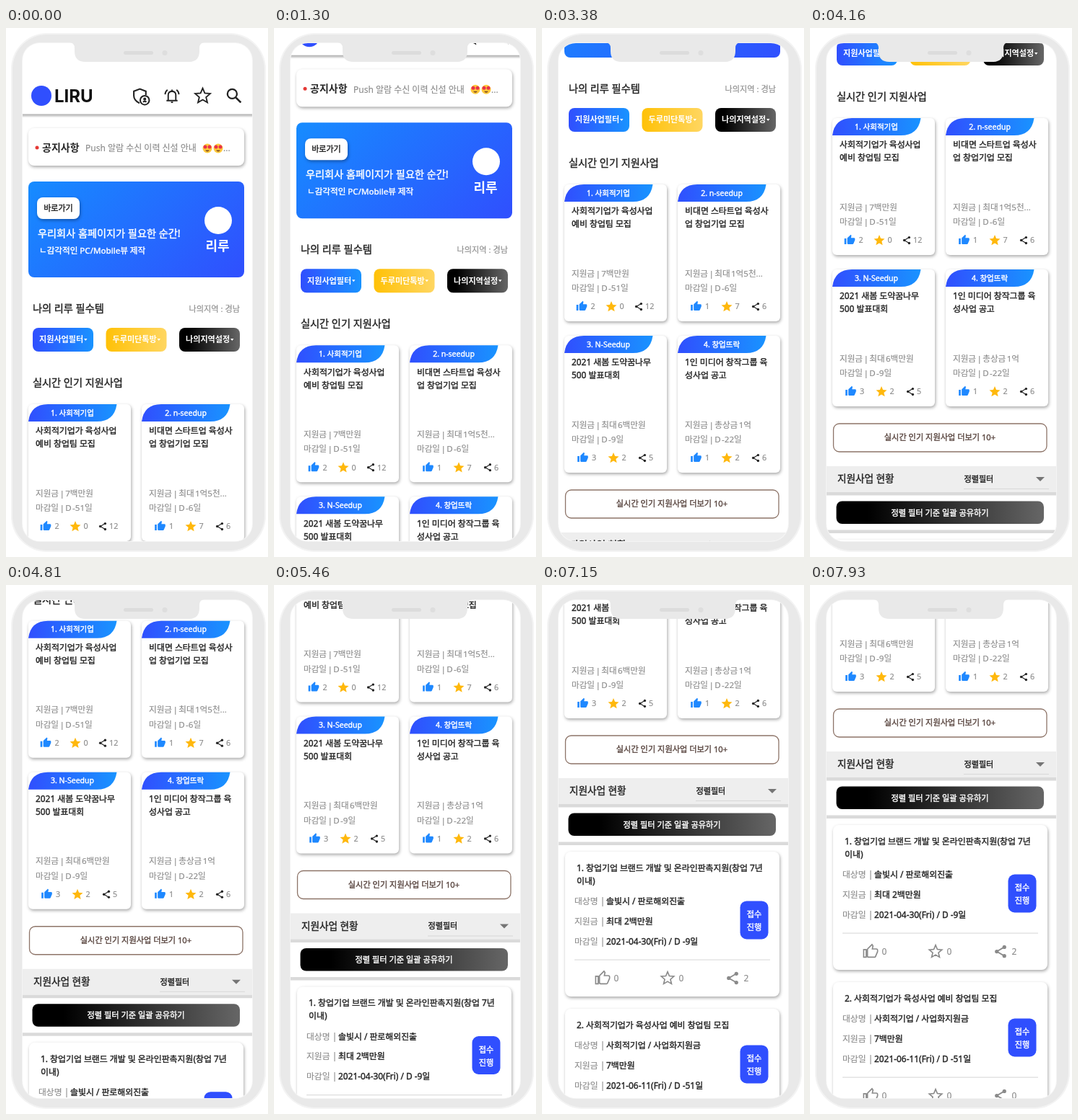
These frames come from a looping animation (363x734 px, 8 s). An HTML page:

```html
<!DOCTYPE html>
<html lang="ko">
<head>
<meta charset="utf-8">
<title>Phone scroll</title>
<style>
html, body { margin: 0; width: 100%; height: 100%; overflow: hidden; background: #fff; }
svg { display: block; width: 363px; height: 734px; }
text { font-family: "Noto Sans", "Noto Sans CJK KR", "Noto Sans CJK", sans-serif; white-space: pre; }
.logo { font-family: Inter, sans-serif; }
.tight { word-spacing: -1.6px; }
.lift { filter: drop-shadow(1px 2px 2px rgba(0, 0, 0, .34)); }
</style>
</head>
<body>
<svg id="stage" viewBox="0 0 363 734" xmlns="http://www.w3.org/2000/svg">
  <defs>
    <linearGradient id="banner" gradientUnits="userSpaceOnUse" x1="72" y1="171" x2="289" y2="388"><stop stop-color="#168cff"/><stop offset="1" stop-color="#304ffe"/></linearGradient>
    <linearGradient id="blue"><stop stop-color="#304ffe"/><stop offset="1" stop-color="#1993ff"/></linearGradient>
    <linearGradient id="gold"><stop stop-color="#ffc107"/><stop offset="1" stop-color="#ffd661"/></linearGradient>
    <linearGradient id="black"><stop offset=".15" stop-color="#000"/><stop offset="1" stop-color="#666"/></linearGradient>
    <linearGradient id="fade" x2="0" y2="1"><stop stop-color="#aaa"/><stop offset="1" stop-color="#fff"/></linearGradient>
    <clipPath id="screen"><rect x="23" y="21" width="318" height="691" rx="24"/></clipPath>
  </defs>
  <rect x="7" y="7" width="353" height="720" rx="50" fill="#f3f3f3"/>
  <rect x="9" y="9" width="349" height="716" rx="48" fill="#e9e9e9"/>
  <rect x="22" y="20" width="320" height="693" rx="25" fill="#f4f4f4"/>
  <g clip-path="url(#screen)">
    <rect x="23" y="21" width="318" height="691" fill="#fff"/>
    <g id="page"></g>
  </g>
  <path d="M87 20q8 0 8 8v4q0 15 15 15h143q15 0 15-15v-4q0-8 8-8z" fill="#e9e9e9"/>
  <rect x="163" y="32" width="41" height="5" rx="2.500" fill="#dcdcdc"/>
  <circle cx="220" cy="34.500" r="3.500" fill="#dedede"/>
</svg>
<script>
const GRAY = '#8c8c8c', INK = '#262626', BLUE = '#304ffe';
const out = [];
const add = s => out.push(s);

// Medium weight is regular type with a thin outline
const OUTLINE = { 400: .15, 500: .4, 700: 0 };
function text(x, cy, str, size, fill = INK, weight = 500, anchor = 'start', cls = '') {
  add(`<text class="${cls}" x="${x}" y="${cy + size * .36}" font-size="${size}" fill="${fill}" stroke="${fill}" stroke-width="${OUTLINE[weight]}" font-weight="${weight}" text-anchor="${anchor}">${str}</text>`);
}
const mid = (x, cy, str, size, fill, weight) => text(x, cy, str, size, fill, weight, 'middle');

function box(x, y, w, h, r, fill, extra = '') {
  add(`<rect x="${x}" y="${y}" width="${w}" height="${h}" rx="${r}" fill="${fill}" ${extra}/>`);
}
const LIFT = 'class="lift"';
const dot = (x, y, r, fill) => add(`<circle cx="${x}" cy="${y}" r="${r}" fill="${fill}"/>`);

// Icons on a 24-unit grid
const SHAPES = {
  thumb: '<path d="M1 21h4V9H1zM23 10q0-2-2-2h-6.300l1-5L14.200 1 7.600 7.600Q7 8 7 9v10q0 2 2 2h9q1.300 0 1.800-1.200l3-7q.2-.5.2-.8z"/>',
  star: '<path d="M12 17.300 18.200 21l-1.700-7L22 9.200l-7.200-.6L12 2 9.200 8.600 2 9.200 7.500 14 5.800 21z"/>',
  share: '<path d="M18 5 6 12l12 7" fill="none" stroke-width="2"/><circle cx="18" cy="5" r="3"/><circle cx="6" cy="12" r="3"/><circle cx="18" cy="19" r="3"/>',
  bell: '<path d="M4 19h16M6.500 18v-7q0-5 5.500-5.500 5.500.5 5.500 5.500v7M12 3v2M10.500 21.500h3M2 10q.3-4 3.500-6.500M22 10q-.3-4-3.500-6.500"/>',
  shield: '<path d="M10 21Q2.500 17 2.500 11V5L10.500 2l8 3v5"/><circle cx="17" cy="17" r="6"/><circle cx="17" cy="15.500" r="1"/><path d="M14.800 19.500q2.200-2 4.400 0"/>',
  search: '<circle cx="9.500" cy="9.500" r="6.300"/><path d="M14.500 14.500 21 21" stroke-width="2.600"/>'
};
function icon(name, cx, cy, size, color, line) {
  const k = size / 24;
  const paint = line ? `fill="none" stroke="${color}" stroke-width="${line}"` : `fill="${color}" stroke="${color}" stroke-width="0"`;
  add(`<g transform="translate(${cx - size / 2} ${cy - size / 2}) scale(${k})" ${paint}>${SHAPES[name]}</g>`);
}

function header() {
  dot(49, 94, 14, BLUE);
  text(67, 94, 'LIRU', 24, '#111', 700, 'start', 'logo');
  icon('shield', 187, 95, 25, '#222', 2);
  icon('bell', 230, 94, 23, '#222', 2);
  icon('star', 272.500, 94, 25, '#222', 1.800);
  icon('search', 316, 94, 25, '#222', 2.200);
  box(23, 119.500, 318, 5, 0, 'url(#fade)');

  box(31, 139, 299, 52, 8, '#fff', LIFT);
  dot(43, 166, 2.500, '#e53935');
  text(50, 166, '공지사항', 14, INK, 700);
  text(110, 167, 'Push 알람 수신 이력 신설 안내', 12, GRAY, 400);
  for (const x of [279, 294]) {
    dot(x, 167, 6.500, '#ffc93c');
    dot(x - 3, 165, 2.500, '#e8334a');
    dot(x + 3, 165, 2.500, '#e8334a');
    add(`<path d="M${x - 3} 169.500h6q-3 4-6 0z" fill="#7a4a1e"/>`);
  }
  text(301, 167, '...', 12, GRAY, 400);
}

function banner() {
  box(31, 213, 299, 133, 8, 'url(#banner)');
  box(43, 235, 59, 30, 8, '#fff', LIFT);
  mid(72.500, 250, '바로가기', 11, '#222', 500);
  text(44, 285, '우리회사 홈페이지가 필요한 순간!', 14.200, '#fff');
  text(46, 309, 'ㄴ감각적인 PC/Mobile뷰 제작', 11.600, '#fff');
  dot(294, 267, 19, '#fff');
  mid(293, 303, '리루', 18, '#fff', 700);
}

function menu() {
  text(37, 389, '나의 리루 필수템', 14.200);
  text(324, 390, '나의지역 : 경남', 11.200, GRAY, 400, 'end');
  const items = [[37, '지원사업필터', 'blue'], [138.500, '두루미단톡방', 'gold'], [240, '나의지역설정', 'black']];
  for (const [x, label, fill] of items) {
    box(x, 416, 84, 33, 8, `url(#${fill})`);
    text(x + 9, 432.500, label, 11.100, '#fff', 700);
    add(`<path d="M${x + 71} 431h4.500l-2.250 3z" fill="#fff"/>`);
  }
  text(37, 492, '실시간 인기 지원사업', 14.200);
}

function tile(x, y, t) {
  box(x, y, 142, 190, 6, '#fff', LIFT);
  add(`<path transform="translate(${x} ${y})" d="M0 24Q3 0 27 0H122.500Q119 24 95 24z" fill="url(#blue)"/>`);
  mid(x + 61, y + 12, t.tag, 10.500, '#fff', 500);
  t.title.forEach((s, i) => text(x + 10, y + 37 + 18 * i, s, 11.900));
  text(x + 10, y + 123.500, '지원금 | ' + t.fund, 11.600, GRAY, 400, 'start', 'tight');
  text(x + 10, y + 144, '마감일 | ' + t.due, 11.600, GRAY, 400, 'start', 'tight');
  const wide = t.counts[2] > 9;
  const [a, b, c] = (wide ? [24, 65, 103] : [25.500, 68, 108]).map(d => x + d);
  const cy = y + 169.500;
  icon('thumb', a, cy - .5, 16, '#1e88ff');
  icon('star', b, cy, 18, '#ffb80c');
  icon('share', c, cy, 13.500, '#222');
  [a + 12.500, b + 11.500, c + 9].forEach((nx, i) => text(nx, cy, t.counts[i], 10.800, GRAY, 400));
}

function row(y, left, right) {
  tile(31, y, left);
  tile(188, y, right);
}

function filterBar() {
  box(32.500, 946, 295.500, 39, 8, '#fff', 'stroke="#8d7468" stroke-width="1.300"');
  mid(180, 965, '실시간 인기 지원사업 더보기 10+', 11.200, '#5d4a44', 500);
  box(23, 1005, 318, 36, 0, '#eee');
  box(23, 1041, 318, 4.500, 0, '#dadada');
  text(38, 1022.500, '지원사업 현황', 13.600);
  text(213.500, 1023, '정렬필터', 11.100, '#222', 500);
  box(213, 1036, 118, 1, 0, '#d8d8d8');
  add('<path d="M313 1020h12l-6 6z" fill="#757575"/>');
  box(36.500, 1053.500, 287.500, 31.500, 8, 'url(#black)');
  mid(180, 1069.500, '정렬 필터 기준 일괄 공유하기', 11.200, '#fff', 500);
  box(23, 1093.500, 318, 4.500, 0, '#dadada');
}

function entry(y, e) {
  const extra = 18 * (e.title.length - 1);
  box(32, y, 297, 183 + extra, 8, '#fff', LIFT);
  e.title.forEach((s, i) => text(48, y + 22.500 + 18 * i, s, 11.900));
  const top = y + extra;
  ['대상명', '지원금', '마감일'].forEach((label, i) => {
    const cy = top + 51 + 27.700 * i;
    text(45, cy, label + ' |', 11.800, GRAY, 400);
    text(89, cy, e.values[i], 11.900);
  });
  box(274.500, top + 50.500, 39, 53, 9, BLUE);
  mid(294, top + 69, '접수', 11.200, '#fff', 500);
  mid(294, top + 87, '진행', 11.200, '#fff', 500);
  box(45, top + 131.500, 271, 1.200, 0, '#dcdcdc');
  ['thumb', 'star', 'share'].forEach((name, i) => {
    const cx = 84 + 90 * i, cy = top + 157.500;
    icon(name, cx, cy, 21, '#8a8a8a', name === 'share' ? 0 : 1.900);
    text(cx + 15.500, cy, e.counts[i], 12, GRAY, 400);
  });
}

header();
banner();
menu();
row(522,
  { tag: '1. 사회적기업', title: ['사회적기업가 육성사업', '예비 창업팀 모집'], fund: '7백만원', due: 'D -51일', counts: [2, 0, 12] },
  { tag: '2. n-seedup', title: ['비대면 스타트업 육성사', '업 창업기업 모집'], fund: '최대 1억5천...', due: 'D -6일', counts: [1, 7, 6] });
row(732,
  { tag: '3. N-Seedup', title: ['2021 새봄 도약꿈나무', '500 발표대회'], fund: '최대 6백만원', due: 'D -9일', counts: [3, 2, 5] },
  { tag: '4. 창업뜨락', title: ['1인 미디어 창작그룹 육', '성사업 공고'], fund: '총상금 1억', due: 'D -22일', counts: [1, 2, 6] });
filterBar();
entry(1107, {
  title: ['1. 창업기업 브랜드 개발 및 온라인판촉지원(창업 7년', '이내)'],
  values: ['솔빛시 / 판로해외진출', '최대 2백만원', '2021-04-30(Fri) / D -9일'], counts: [0, 0, 2] });
entry(1325, {
  title: ['2. 사회적기업가 육성사업 예비 창업팀 모집'],
  values: ['사회적기업 / 사업화지원금', '7백만원', '2021-06-11(Fri) / D -51일'], counts: [0, 0, 0] });

const page = document.getElementById('page');
page.innerHTML = out.join('');

// Scroll path: time (ms), offset (px), speed (px/ms)
const LOOP = 8000, STEP = 130;
const PATH = [
  [0, 0, .03], [2210, 173, .108], [3380, 305, .116], [4160, 397, .118],
  [5460, 549.500, .124], [6240, 651.500, .118], [7930, 774, .025]
];
function scrollAt(t) {
  let i = 0;
  while (i < PATH.length - 2 && t >= PATH[i + 1][0]) i++;
  const [t0, p0, v0] = PATH[i], [t1, p1, v1] = PATH[i + 1];
  const d = t1 - t0, u = (t - t0) / d, w = 1 - u;
  return w * w * (1 + 2 * u) * p0 + u * u * (3 - 2 * u) * p1 + d * u * w * (w * v0 - u * v1);
}
function draw() {
  const t = performance.now() % LOOP;
  const y = scrollAt(Math.floor(t / STEP) * STEP);
  page.setAttribute('transform', `translate(0 ${-y.toFixed(2)})`);
  requestAnimationFrame(draw);
}
draw();
</script>
</body>
</html>
```
